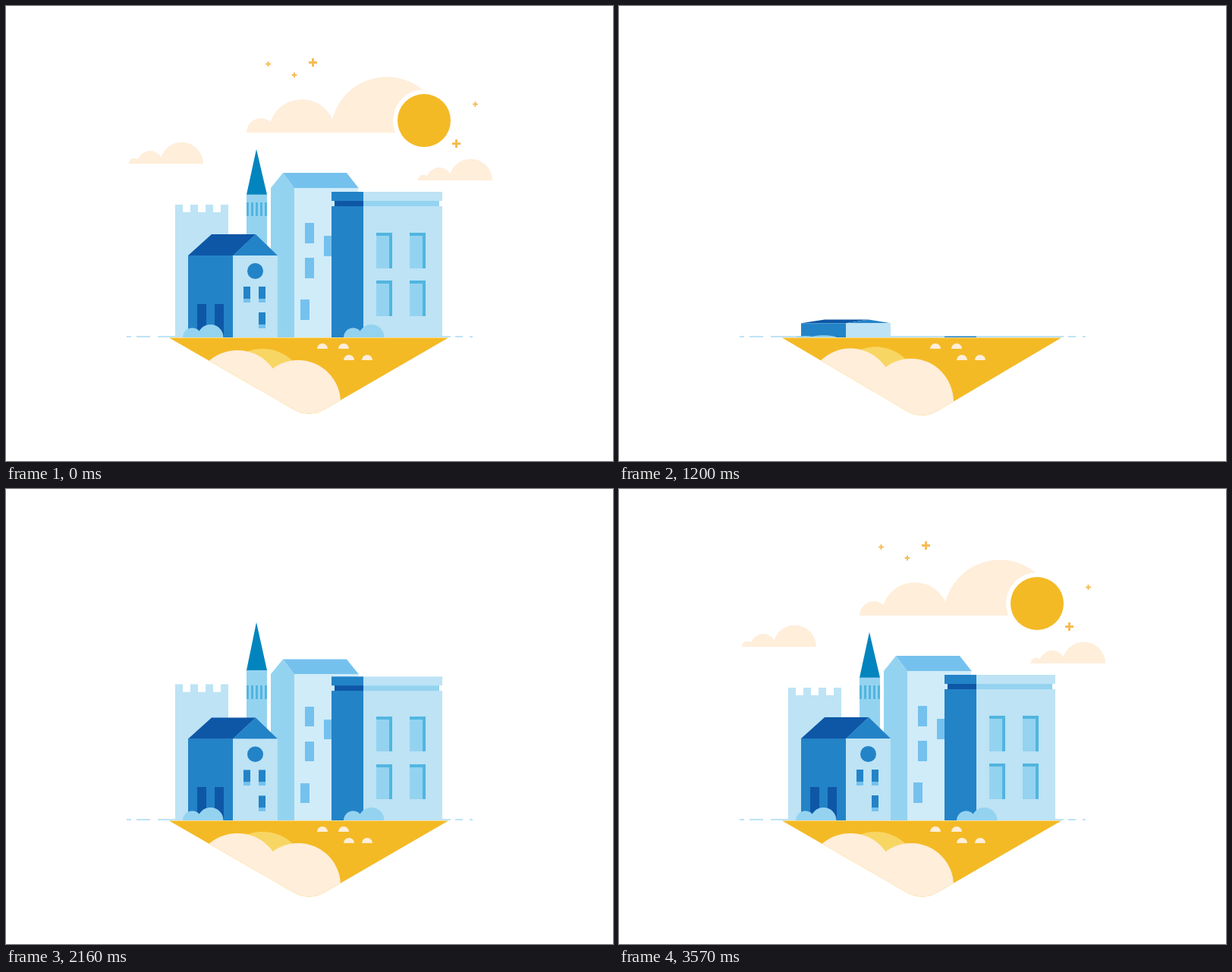
An HTML page with a canvas that plays this animation: 800 px wide and 600 px high, repeating every 3600 ms.

```html
<!DOCTYPE html>
<html lang="en">
<head>
<meta charset="utf-8">
<title>Little town</title>
<style>
html, body { margin: 0; width: 100%; height: 100%; overflow: hidden; background: #fff; }
canvas { display: block; width: 800px; height: 600px; }
</style>
</head>
<body>
<canvas id="stage" width="800" height="600"></canvas>
<script>
const ctx = document.getElementById('stage').getContext('2d');
const LOOP = 3600, FADE = 270, BASE = 437;
const C = {
  gold: '#f4ba25', straw: '#f8d664', cream: '#feeeda', star: '#f7bb55',
  pale: '#d0ecf9', light: '#bde3f5', sky: '#94d3f0', mid: '#75c1ee',
  teal: '#51b5e0', spire: '#0285be', blue: '#2383c7', navy: '#0e57a6'
};

// Straight rise in ms, then a damped swing (Hz, decay per second)
const LAND = { rise: 267, amp: .28, freq: 1, decay: 5 };
const BUILD = { rise: 332, amp: .12, freq: 1.4, decay: 3 };
const POP = { rise: 200, amp: .2, freq: 2, decay: 4 };

let now = 0;

function spring(start, { rise, amp, freq, decay }) {
  const t = now - start;
  if (t <= rise) return Math.max(0, t / rise);
  const s = (t - rise) / 1000;
  return 1 + amp * Math.sin(2 * Math.PI * freq * s) * Math.exp(-decay * s);
}

function easeOut(start, dur) {
  const p = Math.min(1, Math.max(0, (now - start) / dur));
  return 1 - (1 - p) ** 3;
}

function scaled(x, y, sx, sy, draw) {
  if (sx <= 0 || sy <= 0) return;
  ctx.save();
  ctx.translate(x, y);
  ctx.scale(sx, sy);
  ctx.translate(-x, -y);
  draw();
  ctx.restore();
}

// Stretch a drawing upwards (or downwards) from the line y
const grow = (start, kind, y, draw) => scaled(0, y, 1, spring(start, kind), draw);

function rect(color, x, y, w, h) {
  ctx.fillStyle = color;
  ctx.fillRect(x, y, w, h);
}

function poly(color, ...pts) {
  ctx.fillStyle = color;
  ctx.beginPath();
  for (let i = 0; i < pts.length; i += 2) ctx.lineTo(pts[i], pts[i + 1]);
  ctx.fill();
}

function disc(color, x, y, r, from = 0) {
  ctx.fillStyle = color;
  ctx.beginPath();
  ctx.arc(x, y, r, from, 2 * Math.PI);
  ctx.fill();
}

const dome = (color, x, y, r) => disc(color, x, y, r, Math.PI);

function groundPath() {
  const top = BASE + .6;
  ctx.beginPath();
  ctx.moveTo(215, top);
  ctx.lineTo(583, top);
  ctx.lineTo(419, 532.6);
  ctx.quadraticCurveTo(399.5, 543, 380, 532.6);
  ctx.closePath();
}

function ground() {
  const s = spring(528, LAND);
  if (!s) return;
  ctx.save();
  ctx.translate(0, BASE * (1 - s));
  ctx.scale(1, s);
  groundPath();
  ctx.fillStyle = C.gold;
  ctx.fill();
  ctx.clip();
  // the clip keeps the stretched outline, the hills move on their own
  ctx.setTransform(1, 0, 0, 1, 0, 0);
  grow(780, POP, 538, () => {
    disc(C.straw, 338, 510, 58);
    disc(C.cream, 305, 511, 57);
    disc(C.cream, 385, 523, 56);
  });
  ctx.restore();
  for (let i = 0; i < 4; i++) {
    const row = i >> 1, x = 417 + row * 35 + (i % 2) * (28 - row * 4), y = 452 + row * 15;
    const k = easeOut(810 + i * 30, 140);
    scaled(x, y, k, k, () => dome(C.cream, x, y, 7));
  }
}

function horizon() {
  scaled(387, 436, easeOut(600, 420), 1, () => {
    ctx.strokeStyle = C.light;
    ctx.lineWidth = 2;
    ctx.setLineDash([6, 7, 18, 10, 386, 6, 10, 9]);
    ctx.beginPath();
    ctx.moveTo(159, 436);
    ctx.lineTo(615, 436);
    ctx.stroke();
  });
}

function castle() {
  grow(1802, BUILD, BASE, () => {
    rect(C.light, 223, 272, 70, 165);
    for (let x = 223; x < 293; x += 20) rect(C.light, x, 262, 10, 10.5);
  });
}

function tower() {
  grow(1598, BUILD, BASE, () => {
    rect(C.sky, 317, 249, 27, 188);
    poly(C.spire, 330, 189, 344, 249, 317, 249);
  });
  grow(1960, POP, 277, () => {
    for (let x = 317; x < 344; x += 6) rect(C.teal, x, 259, 3, 18);
  });
}

function block() {
  grow(1396, BUILD, BASE, () => {
    poly(C.mid, 365, 220, 449, 220, 465, 240.4, 380, 240.4);
    poly(C.sky, 349, 240, 365, 220, 380, 240, 380, BASE, 349, BASE);
    rect(C.pale, 380, 240, 84, 197);
  });
  for (const [x, y] of [[394, 286], [394, 332], [388, 387], [419, 303]])
    grow(1650, POP, y + 27, () => rect(C.mid, x, y, 12, 27));
}

function house() {
  grow(1143.5, BUILD, BASE, () => {
    poly(C.navy, 240, 329.4, 240, 329, 271, 301, 329, 301, 299, 329.4);
    poly(C.blue, 329, 301, 358, 329, 358, 329.4, 299, 329.4, 299, 329);
    rect(C.blue, 240, 329, 59, 108);
    rect(C.light, 299, 329, 59, 108);
  });
  grow(1710, POP, BASE, () => {
    for (const x of [252, 275]) rect(C.navy, x, 393, 12, 44);
  });
  grow(1516, POP, 360, () => disc(C.blue, 328.5, 349.5, 10.5));
  for (const [x, y] of [[313, 370], [333, 370], [333, 404]])
    grow(1516, POP, y + 21, () => {
      rect(C.mid, x, y + 15, 9, 6);
      rect(C.blue, x, y, 9, 16);
    });
}

function hall() {
  // one horizontal layer: shaded side, lit front
  const layer = (side, front, inset, y, h) => {
    rect(side, 429 + inset, y, 42 - inset, h);
    rect(front, 471, y, 104 - inset, h);
  };
  grow(1198.5, BUILD, BASE, () => {
    layer(C.navy, C.sky, 4, 256, 9);
    layer(C.blue, C.light, 0, 245, 12);
    layer(C.blue, C.light, 0, 264, 173);
  });
  for (const y of [299, 362])
    for (const x of [488, 532])
      grow(1522, POP, y + 47, () => {
        rect(C.sky, x, y, 21, 47);
        rect(C.teal, x, y, 21, 4);
        rect(C.teal, x + 17, y, 4, 47);
      });
}

function bush(start, x) {
  grow(start, POP, BASE, () => {
    dome(C.sky, x, BASE, 12.5);
    dome(C.sky, x + 24, BASE, 17);
  });
}

function smallCloud(start, x, y) {
  grow(start, POP, y, () => {
    dome(C.cream, x + 7, y, 7.5);
    dome(C.cream, x + 28, y, 17);
    dome(C.cream, x + 69.5, y, 28.5);
  });
}

function star(start, x, y, size, weight) {
  const k = easeOut(start, 300);
  scaled(x, y, k, k, () => {
    rect(C.star, x - size / 2, y - weight / 2, size, weight);
    rect(C.star, x - weight / 2, y - size / 2, weight, size);
  });
}

function sky() {
  smallCloud(2558, 162, 208);
  smallCloud(2525, 543, 230);
  grow(2553, POP, 167, () => {
    dome(C.cream, 336, 167, 19);
    dome(C.cream, 390, 167, 44);
    dome(C.cream, 502, 167, 74);
  });
  const sun = easeOut(2280, 360);
  scaled(551, 151, sun, sun, () => {
    disc('#fff', 551, 151, 41);
    disc(C.gold, 551, 151, 35);
  });
  [[404.5, 74.5], [593.5, 181.5]].forEach(([x, y], i) => star(2840 + i * 180, x, y, 11, 3));
  [[345.5, 76.5], [380, 91], [618.5, 129.5]].forEach(([x, y], i) => star(2900 + i * 90, x, y, 6.7, 2));
}

function render(t) {
  // the loop opens by fading out the finished town
  const fading = t < FADE;
  now = fading ? t + LOOP : t;
  ctx.canvas.style.opacity = fading ? 1 - t / FADE : 1;
  ctx.clearRect(0, 0, 800, 600);
  horizon();
  sky();
  castle();
  tower();
  block();
  house();
  hall();
  bush(1170, 245.5);
  bush(1200, 457.5);
  ground();
}

const begin = performance.now();
function tick() {
  render((performance.now() - begin) % LOOP);
  requestAnimationFrame(tick);
}
tick();
</script>
</body>
</html>
```
